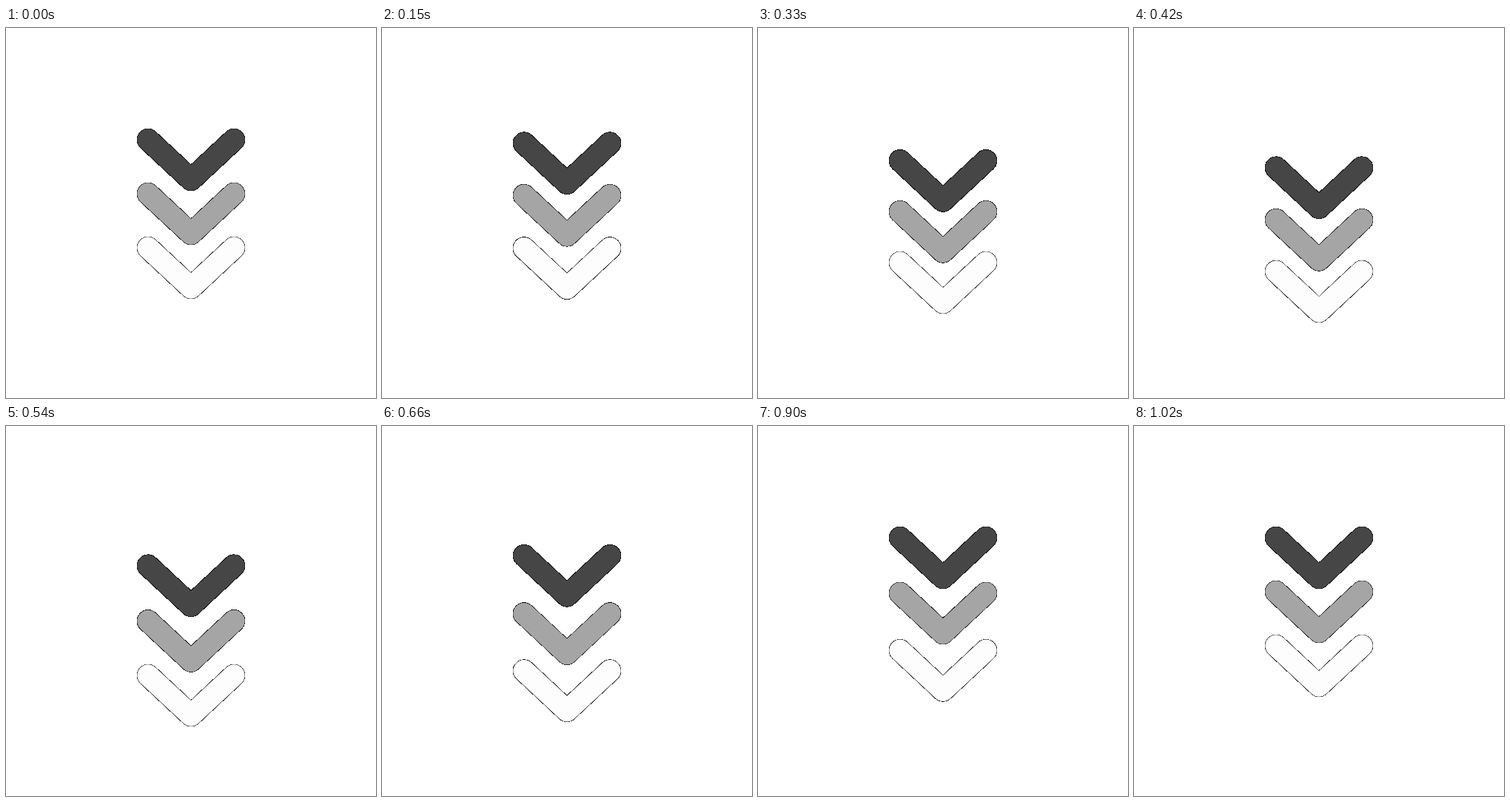
Recreate the animation shown at these times as an HTML page. Size 500 by 500 pixels, loop 1050 ms.

```html
<!DOCTYPE html>
<html lang="en">
<head>
<meta charset="utf-8">
<title>Scroll arrows</title>
<style>
  html, body { margin: 0; width: 100%; height: 100%; overflow: hidden; background: #fff; }
  svg { display: block; width: 100%; height: 100%; }
  path { fill: none; stroke-linecap: round; stroke-linejoin: round; }
  .edge { stroke: #000; stroke-width: 30.8; shape-rendering: crispEdges; }
  .body { stroke-width: 29.4; }
</style>
</head>
<body>
<svg viewBox="0 0 500 500"></svg>
<script>
const LOOP = 1050, STEP = 30, TRAVEL = 40;
const SHAPE = 'M192 151L250 205L308 151';
const svg = document.querySelector('svg');

// A smooth body over a hard-edged black one leaves a fine, uneven outline.
svg.innerHTML = ['#464646', '#a5a5a5', '#fdfdfd'].map(color =>
  `<g><path class="edge" d="${SHAPE}"/><path class="body" d="${SHAPE}" stroke="${color}"/></g>`
).join('');
const arrows = [...svg.children];

const ease = (t, from, to) => {
  const x = Math.min(1, Math.max(0, (t - from) / (to - from)));
  return x * x * (3 - 2 * x);
};

// Each lower arrow starts later and returns more slowly.
function drop(t, i) {
  const start = 60 + 30 * i, peak = start + 420, end = 900 + 60 * i;
  return TRAVEL * (ease(t, start, peak) - ease(t, peak, end));
}

function draw() {
  const t = Math.floor(performance.now() % LOOP / STEP) * STEP;
  arrows.forEach((arrow, i) =>
    arrow.setAttribute('transform', `translate(0 ${73 * i + drop(t, i)})`));
  requestAnimationFrame(draw);
}
draw();
</script>
</body>
</html>
```
